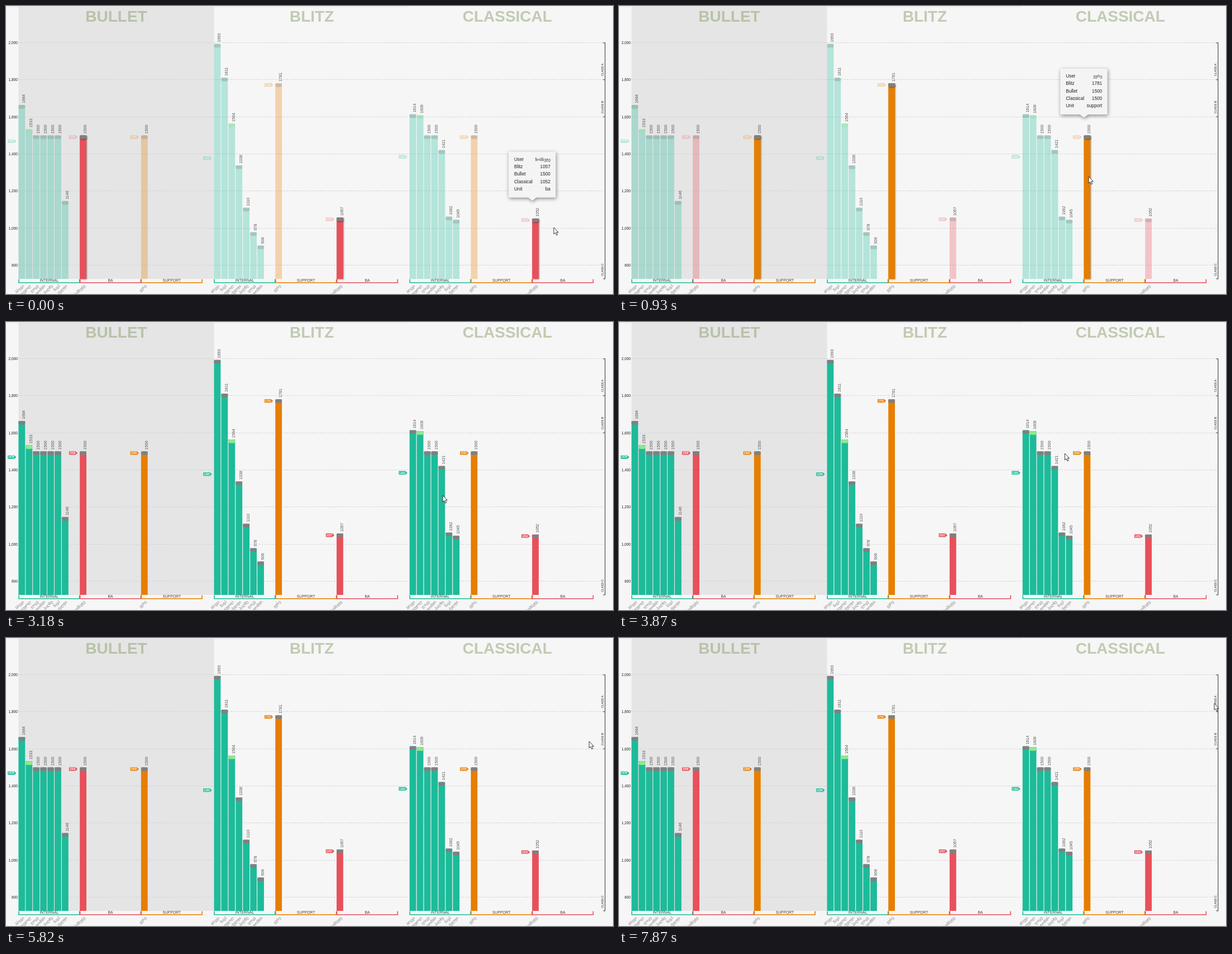
These frames come from a looping animation (1087 px wide and 515 px high, 8 s). An HTML page:

```html
<!DOCTYPE html>
<html lang="en">
<head>
<meta charset="utf-8">
<title>Ratings</title>
<style>
  html, body { margin: 0; width: 100%; height: 100%; overflow: hidden; background: #f6f6f6; }
  svg { display: block; width: 1087px; height: 515px; }
  text { font-family: Arial, "Liberation Sans", "DejaVu Sans", sans-serif; }
  .title { font-size: 28px; font-weight: bold; text-anchor: middle; fill: rgba(140, 160, 110, .5); }
  .grid { stroke: #d2d2d2; stroke-dasharray: 3 2; }
  .tick { font-size: 6.6px; text-anchor: end; fill: #222; }
  .value { font-size: 7.1px; fill: #555; }
  .unit { font-size: 6.8px; text-anchor: middle; fill: #444; }
  .name { font: 6.5px "DejaVu Sans", sans-serif; text-anchor: end; fill: #777; }
  .class { font-size: 5.3px; text-anchor: middle; fill: #222; }
  .avg text { font-size: 4.9px; font-weight: bold; text-anchor: middle; fill: #fff; }
  .dim .bar rect, .dim .avg { opacity: .3; }
  .dim .bar.on rect { opacity: 1; filter: drop-shadow(1.5px 1.5px 1px rgba(0, 0, 0, .4)); }
  #tip > path { fill: #f4f4f4; filter: drop-shadow(1px 2px 3px rgba(0, 0, 0, .45)); }
  #tip text { font-size: 8.25px; fill: #222; }
  #tip .val { text-anchor: end; }
  #tip .val.user { font: 6.8px "DejaVu Sans", sans-serif; }
</style>
</head>
<body>
<svg id="stage" viewBox="0 0 1087 515"></svg>
<script>
const stage = document.getElementById('stage');
const BASE = 488, LEFT = 22.4, BAR = 12.93, UNIT = 109.75, PANEL = 350.15;
const COLOR = { internal: '#1dbb9a', ba: '#e8505b', support: '#e67e00' };
const NAMES = ['ბრევა', 'დუჟოლ', 'ლიკვ', 'თომბრ', 'პალზუ', 'ზავპ', 'ქელტი', 'ზოშბუტე', 'ჟურე'];
const USER = { ba: 7, support: 8 }, GREEN = 1;

// Scores run from the highest to the lowest; users gives their order
const PANELS = [
  { title: 'Bullet', units: ['internal', 'ba', 'support'], users: [0, 1, 2, 3, 4, 5, 6],
    internal: [1664, 1533, 1500, 1500, 1500, 1500, 1146], ba: [1500], support: [1500] },
  { title: 'Blitz', units: ['internal', 'support', 'ba'], users: [0, 5, 1, 6, 4, 2, 3],
    internal: [1993, 1811, 1564, 1338, 1110, 978, 906], ba: [1057], support: [1781] },
  { title: 'Classical', units: ['internal', 'support', 'ba'], users: [0, 1, 2, 3, 4, 5, 6],
    internal: [1614, 1609, 1500, 1500, 1421, 1062, 1045], ba: [1052], support: [1500] }
];

const yOf = v => 65.5 + (2000 - v) * 0.33167;
const mean = list => Math.round(list.reduce((a, b) => a + b) / list.length);
const turned = (x, y, deg) => `translate(${x} ${y}) rotate(${deg})`;

function add(parent, tag, attrs, text) {
  const el = document.createElementNS('http://www.w3.org/2000/svg', tag);
  for (const k in attrs) el.setAttribute(k, attrs[k]);
  if (text !== undefined) el.textContent = text;
  parent.appendChild(el);
  return el;
}

const bars = [];

function drawBar(panel, unit, user, score, x) {
  const y = yOf(score);
  const el = add(stage, 'g', { class: 'bar' });
  add(el, 'rect', { x, y, width: 11.8, height: BASE - y, fill: COLOR[unit] });
  add(el, 'rect', { x, y, width: 11.8, height: 6.5, rx: 2.6, fill: user === GREEN ? '#8ee98b' : '#808080' });
  add(stage, 'text', { class: 'value', transform: turned(x + 11.6, y - 3.2, -90) }, score);
  add(stage, 'text', { class: 'name', transform: turned(x + 10, 501, -45) }, NAMES[user]);
  bars.push({ el, panel, unit, user, score, x, y });
}

function drawAvg(value, x, color) {
  const y = yOf(value) + 3;
  const el = add(stage, 'g', { class: 'avg' });
  add(el, 'path', { d: `M${x - 19.3} ${y - 3.2}h11.8l3.6 3.2l-3.6 3.2h-11.8z`, fill: color });
  add(el, 'text', { x: x - 13, y: y + 1.8 }, value);
}

function drawPanel(panel, i) {
  const left = LEFT + i * PANEL;
  add(stage, 'text', { class: 'title', x: left + PANEL / 2, y: 28 }, panel.title.toUpperCase());
  panel.units.forEach((unit, j) => {
    const x = left + j * UNIT, color = COLOR[unit];
    add(stage, 'path', { d: `M${x + .5} 488.5V494.8h${UNIT - 1}V488.5`, fill: 'none', stroke: color, 'stroke-width': 1.6 });
    add(stage, 'text', { class: 'unit', x: x + UNIT / 2, y: 493.3 }, unit.toUpperCase());
    panel[unit].forEach((score, k) =>
      drawBar(panel.title, unit, USER[unit] ?? panel.users[k], score, x + k * BAR));
    drawAvg(mean(panel[unit]), x, color);
  });
}

// Backdrop, grid and scale
add(stage, 'rect', { x: LEFT, y: 1, width: PANEL, height: BASE - 1, fill: '#e5e5e5' });
add(stage, 'path', { d: 'M0 1H722', stroke: '#e4e4e4' });
for (let v = 2000; v >= 800; v -= 200) {
  const y = yOf(v);
  add(stage, 'path', { class: 'grid', d: `M22 ${Math.floor(y) + .5}H1072` });
  add(stage, 'text', { class: 'tick', x: 21, y: y + 2.4 }, v.toLocaleString('en-US'));
}
PANELS.forEach(drawPanel);
add(stage, 'path', { d: 'M1069.5 65.8H1072.7V487.7H1069.5M1069.5 131.8H1072.7M1069.5 198H1072.7',
  fill: 'none', stroke: '#666', 'stroke-width': 1.4 });
[['A', 114], ['B', 181], ['C', 471.5]].forEach(([c, y]) =>
  add(stage, 'text', { class: 'class', transform: turned(1070, y, -90) }, 'CLASS ' + c));

// Tooltip, placed by its top left corner
const tip = add(stage, 'g', { id: 'tip' });
add(tip, 'path', { d: 'M2 0H82.5Q84.5 0 84.5 2V80Q84.5 82 82.5 82H50L42.5 87.5L35 82H2Q0 82 0 80V2Q0 0 2 0z' });
const cells = ['User', 'Blitz', 'Bullet', 'Classical', 'Unit'].map((label, i) => {
  const y = 16 + i * 13.3;
  add(tip, 'text', { x: 10, y }, label);
  return add(tip, 'text', { class: i ? 'val' : 'val user', x: 75, y });
});

const arrow = add(stage, 'path', { d: 'M0 0V11.8L2.7 9.4L4.7 13.8L6.7 12.9L4.8 8.7H8.3z',
  fill: '#fff', stroke: '#222', 'stroke-width': .9 });
const beam = add(stage, 'path', { d: 'M1066.5 173.5H1071.5M1069 173.5V188.5M1066.5 188.5H1071.5',
  stroke: '#333', fill: 'none' });

// Pointer: rests between moves, each given as start, end and the point reached
const MOVES = [
  [0, 0, 981, 396], [150, 150, 1018, 332], [150, 540, 862, 297], [540, 810, 841, 305],
  [1480, 1760, 807, 323], [1920, 2220, 786, 314], [2220, 2340, 782, 310],
  [3180, 3570, 813, 226], [3570, 4030, 769, 253], [4740, 4740, 801, 224],
  [4740, 5010, 930, 129], [5010, 5400, 1028, 193], [5400, 6360, 1066, 174],
  [7200, 7470, 1031, 145], [7470, 7870, 1066, 117]
];

const HOVERS = [
  { from: 0, to: 150, user: USER.ba },
  { from: 810, to: 1340, user: USER.support },
  { from: 2340, to: 3180, user: 4 },
  { from: 4030, to: 4740, user: 3 },
  { from: 6360, to: 7200, range: [1600, 1800] }
];

// The pointer jumps about every 135 ms instead of gliding
function pointerAt(t) {
  let x = 0, y = 0;
  for (const [from, to, nx, ny] of MOVES) {
    if (t < from) break;
    const n = Math.max(1, Math.round((to - from) / 135));
    const p = t >= to ? 1 : Math.floor((t - from) / (to - from) * n) / n;
    x += (nx - x) * p;
    y += (ny - y) * p;
  }
  return `translate(${x} ${y})`;
}

function fillTip(user) {
  const own = bars.filter(b => b.user === user);
  const { x, y, unit } = own.find(b => b.panel === 'Classical');
  const score = panel => own.find(b => b.panel === panel).score;
  [NAMES[user], score('Blitz'), score('Bullet'), score('Classical'), unit]
    .forEach((v, i) => cells[i].textContent = v);
  tip.setAttribute('transform', `translate(${x - 42.3} ${y - 119.3})`);
}

function setHover(hover) {
  const range = hover?.range, user = hover?.user;
  stage.classList.toggle('dim', !!hover);
  for (const b of bars) {
    b.el.classList.toggle('on', range ? b.score >= range[0] && b.score < range[1] : b.user === user);
  }
  tip.style.display = user === undefined ? 'none' : '';
  if (user !== undefined) fillTip(user);
  arrow.style.display = range ? 'none' : '';
  beam.style.display = range ? '' : 'none';
}

let start, current = null;
function tick(now) {
  start ??= now;
  const t = (now - start) % 8000;
  const hover = HOVERS.find(h => t >= h.from && t < h.to);
  if (hover !== current) setHover(current = hover);
  arrow.setAttribute('transform', pointerAt(t));
  requestAnimationFrame(tick);
}
requestAnimationFrame(tick);
</script>
</body>
</html>
```
